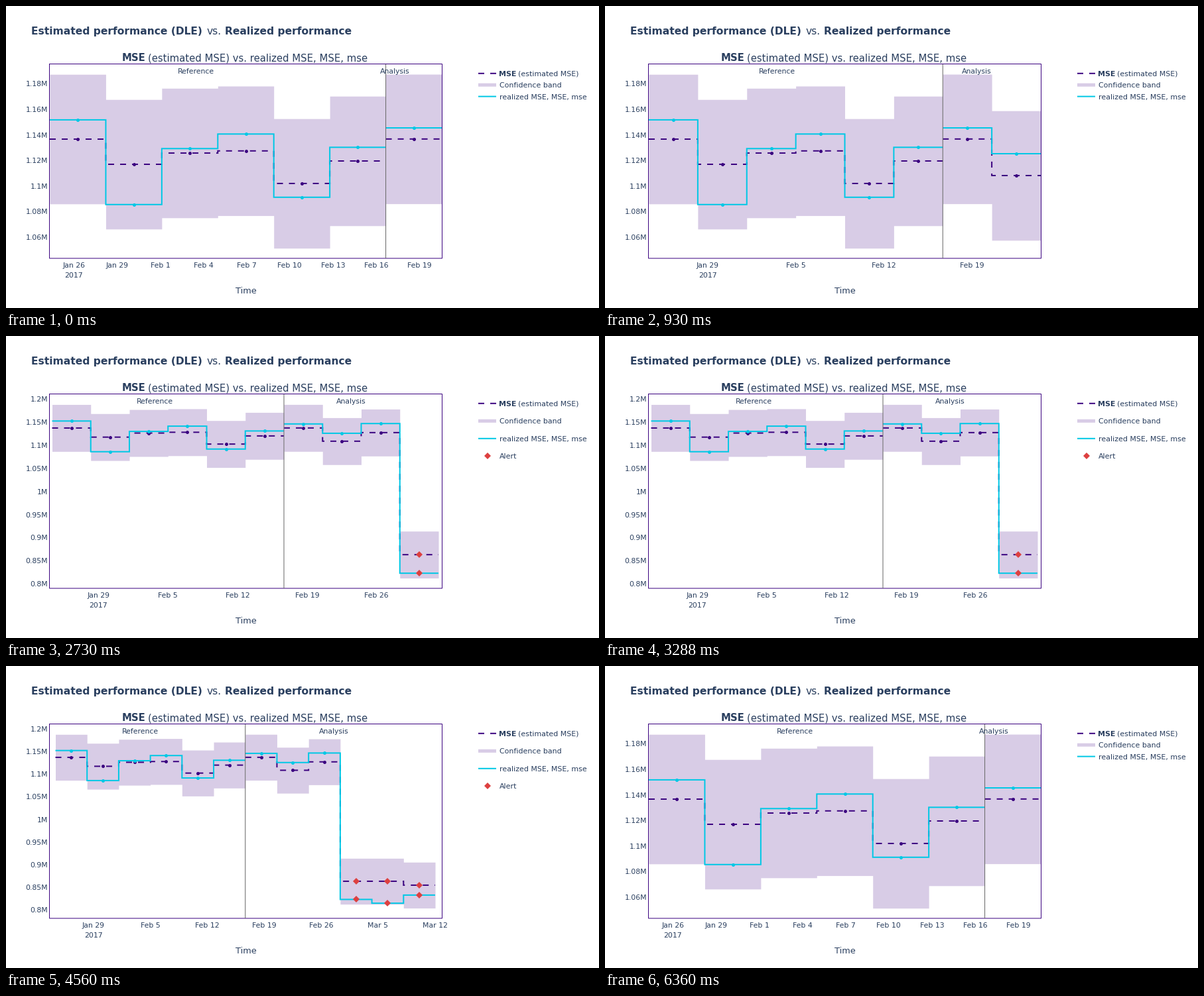
A matplotlib script for the animation above (6390 ms loop, 894 by 456 pixels).

```python
import numpy as np
import matplotlib.pyplot as plt
from matplotlib.animation import FuncAnimation

W, H, DPI = 894, 456, 96
PX = 72 / DPI  # points per pixel
INTERVAL, LOOP = 30, 6390

INK, PURPLE, CYAN = "#2a3f5f", "#3b0280", "#00c8e5"
BAND, RED, GRAY = "#d8cce6", "#dd4040", "#666666"

ESTIMATED = np.array([1.1366, 1.1169, 1.1257, 1.1274, 1.1019, 1.1195,
                      1.1367, 1.1081, 1.1267, 0.8630, 0.8630, 0.8544])
REALIZED = np.array([1.1517, 1.0854, 1.1292, 1.1406, 1.0911, 1.1302,
                     1.1454, 1.1252, 1.1462, 0.8229, 0.8145, 0.8325])
HALF_BAND = 0.0507
REFERENCE_CHUNKS, FIRST_ALERT = 6, 9
FIRST_DAY, CHUNK_DAYS = 24.334, 3.89  # days counted from the start of January

# start ms, chunks shown, left and right data edge, pixels per million
SCENES = [
    (0, 7, 66, 657, 1929),
    (930, 8, 66, 657, 1929),
    (1830, 9, 66, 657, 1929),
    (2730, 10, 69.5, 652, 699),
    (3660, 11, 72.5, 649, 691.3),
    (4560, 12, 74.5, 647, 683.8),
]
REWIND = 6360

plt.rcParams.update({"font.family": "DejaVu Sans", "path.snap": False})
fig = plt.figure(figsize=(W / DPI, H / DPI), dpi=DPI, facecolor="white")
ax = fig.add_axes([0, 0, 1, 1])
ax.set(xlim=(0, W), ylim=(H, 0))
ax.axis("off")


def text(x, y, label, size=10.9, ha="center", weight="normal"):
    return ax.text(x, y, label, fontsize=size * PX, ha=ha, va="baseline",
                   weight=weight, color=INK, zorder=6)


def line(x, y, color, width=2, dashed=False, z=3):
    style = (0, (4.5, 4.5)) if dashed else "-"
    return ax.plot(x, y, color=color, lw=width * PX, ls=style, zorder=z,
                   solid_capstyle="butt", dash_capstyle="butt",
                   solid_joinstyle="miter", dash_joinstyle="miter")[0]


def markers(x, y, color, shape="o", size=5, z=4):
    return ax.plot(x, y, shape, color=color, ms=size * PX, mew=0, zorder=z)[0]


def box(x, y, w, h):
    return ax.add_patch(plt.Rectangle((x, y), w, h, fc=BAND, lw=0, zorder=1))


def day_label(day):
    for month, length in (("Jan", 31), ("Feb", 28), ("Mar", 31)):
        if day <= length:
            return f"{month} {day}"
        day -= length


def draw_static():
    text(38, 43, "Estimated performance (DLE)", 15.5, "left", "bold")
    text(302.5, 43, "vs.", 15.5, "left")
    text(330.5, 43, "Realized performance", 15.5, "left", "bold")
    text(175, 83, "MSE", 14.9, "left", "bold")
    text(214.5, 83, "(estimated MSE) vs. realized MSE, MSE, mse", 14.9, "left")
    text(361.5, 434, "Time", 12.9)
    line([65.5, 657.5, 657.5, 65.5, 65.5], [87.5, 87.5, 381, 381, 87.5],
         PURPLE, 1, z=5)


def draw_legend(alerts):
    step = 26.5 if alerts else 17.4
    rows = 101.8 + step * np.arange(4)
    swatch = [712, 739]
    items = [
        line(swatch, [rows[0]] * 2, PURPLE, dashed=True),
        box(712, rows[1] - 2.5, 27, 5),
        line(swatch, [rows[2]] * 2, CYAN),
        text(743.5, rows[0] + 4, "MSE", 11.05, "left", "bold"),
        text(772.5, rows[0] + 4, "(estimated MSE)", 11.05, "left"),
        text(743.5, rows[1] + 4, "Confidence band", 11.05, "left"),
        text(743.5, rows[2] + 4, "realized MSE, MSE, mse", 11.05, "left"),
    ]
    if alerts:
        items += [markers([725.5], [rows[3]], RED, "D", 7.4),
                  text(743.5, rows[3] + 4, "Alert", 11.05, "left")]
    return items


def draw_axes(chunks, left, width, to_y, alerts):
    values = np.arange(0.8, 1.21, 0.05) if alerts else np.arange(1.06, 1.19, 0.02)
    items = [text(63, to_y(v) + 4.2, f"{round(v, 2):g}M", ha="right")
             for v in values]
    day, step = (26, 3) if chunks == 7 else (29, 7)
    first = day
    while (x := left + (day - FIRST_DAY) * width / CHUNK_DAYS) < 657:
        items.append(text(x, 395, day_label(day)))
        if day == first:
            items.append(text(x, 409.5, "2017"))
        day += step
    return items


def draw_period(edges, low, high, to_y):
    """Band and both step lines for one run of chunks."""
    x = np.repeat(edges[low:high + 1], 2)[1:-1]
    est, real = (np.repeat(v[low:high], 2) for v in (ESTIMATED, REALIZED))
    band = ax.fill_between(x, to_y(est - HALF_BAND), to_y(est + HALF_BAND),
                           color=BAND, lw=0, zorder=1)
    return [band, line(x, to_y(est), PURPLE, dashed=True, z=2),
            line(x, to_y(real), CYAN, z=3)]


def draw_scene(chunks, left, right, scale):
    alerts = chunks > FIRST_ALERT
    anchor, top = (1.2, 94.6) if alerts else (1.18, 117.3)
    edges = np.linspace(left, right, chunks + 1)
    width = edges[1] - edges[0]
    middle = edges[:-1] + width / 2
    split = edges[REFERENCE_CHUNKS]

    def to_y(value):
        return top + (anchor - value) * scale

    items = draw_legend(alerts) + draw_axes(chunks, left, width, to_y, alerts)
    items += draw_period(edges, 0, REFERENCE_CHUNKS, to_y)
    items += draw_period(edges, REFERENCE_CHUNKS, chunks, to_y)
    for values, color, z in ((ESTIMATED, PURPLE, 2.5), (REALIZED, CYAN, 3.5)):
        y = to_y(values[:chunks])
        items.append(markers(middle, y, color, z=z))
        items.append(markers(middle[FIRST_ALERT:], y[FIRST_ALERT:], RED, "D", 7.4))
    items += [
        line([split, split], [88, 381], GRAY, 1, z=5),
        text(left + 2.5 * width + 9, 101.5, "Reference"),
        text(split + (chunks - 7) / 2 * width + 13.8, 101.5, "Analysis"),
    ]
    return items


draw_static()
scenes = [draw_scene(*scene[1:]) for scene in SCENES]
starts = [scene[0] for scene in SCENES]
ax.set(xlim=(0, W), ylim=(H, 0))


def update(frame):
    now = frame * INTERVAL
    current = 0 if now >= REWIND else sum(now >= s for s in starts) - 1
    for index, items in enumerate(scenes):
        for item in items:
            item.set_visible(index == current)
    return []


animation = FuncAnimation(fig, update, frames=LOOP // INTERVAL, init_func=lambda: update(0),
                          interval=INTERVAL, repeat=True, repeat_delay=0)
plt.show()
```
